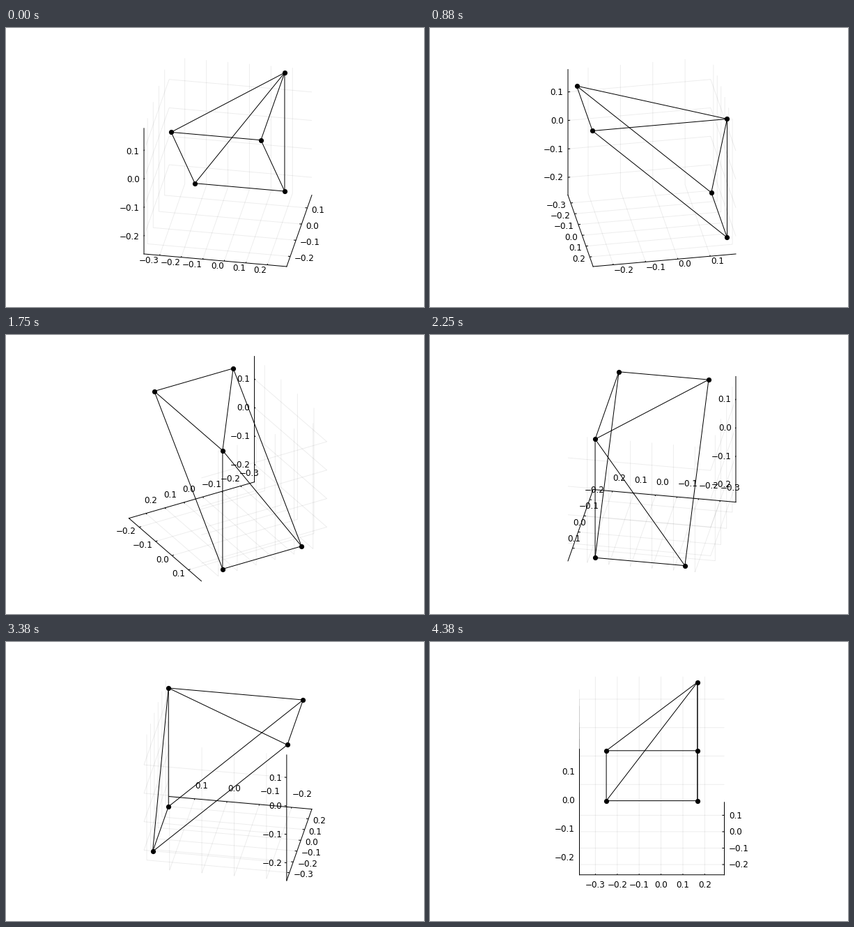
A matplotlib script for the animation above (4.51 s loop, 600 px wide and 400 px high).

```python
import numpy as np
import matplotlib.pyplot as plt
from matplotlib.animation import FuncAnimation
from matplotlib.collections import LineCollection

W, H, DPI = 600, 400, 100
PX = 72 / DPI                      # one pixel in points
POSES, POSE_MS = 36, 125           # the camera turns 10 degrees per pose
FRAMES, FRAME_MS = 205, 22         # 4510 ms in all
CX, CY, SIDE = 318.5, 191.7, 208   # projected centre and cube side
EL = np.radians(30)

# Data limits: 3 % padding, x stretched by the stage's aspect ratio
LO, HI = -1 / 4, 1 / 6
MID, SPAN = (LO + HI) / 2, (HI - LO) * 1.06
SPANS = np.array([SPAN * 1.5, SPAN, SPAN])

VERTS = [(HI, HI, HI), (HI, LO, HI), (HI, HI, LO), (LO, LO, HI), (LO, HI, LO)]
EDGES = [(0, 1), (0, 2), (0, 3), (0, 4), (1, 2), (1, 3), (2, 4), (3, 4)]
TICKS = [[-.3, -.2, -.1, 0, .1, .2], [-.2, -.1, 0, .1], [-.2, -.1, 0, .1]]
TICK_LEN = .015


def unit(value, axis):
    """Data value to cube coordinate in [-.5, .5]."""
    return (value - MID) / SPANS[axis]


def project(points, az):
    x, y, z = np.moveaxis(np.asarray(points, float), -1, 0)
    u = x * np.cos(az) + y * np.sin(az)
    depth = -x * np.sin(az) + y * np.cos(az)
    v = z * np.cos(EL) + depth * np.sin(EL)
    return np.stack([CX + SIDE * u, CY - SIDE * v], axis=-1)


def label_place(theta):
    """Offset (dx, dy) and alignment for an axis at screen angle theta."""
    out = np.radians(theta - 90)
    dx, dy = np.cos(out), -np.sin(out)
    if theta == 0:
        return 0, 14, 'center'
    if theta <= 90:
        return 6.4 * dx, 6.8 * dy, 'left'
    if theta < 270:
        return 7.5 * dx, 7.5 * dy - 11.8, 'left'
    return 6.4 * dx, 6.8 * dy, 'right'


def axis_angle(axis, az):
    if axis == 2:
        return 270
    if axis == 0:
        right, up = np.cos(az), -np.sin(az) * np.sin(EL)
    else:
        right, up = np.sin(az), np.cos(az) * np.sin(EL)
    return round(np.degrees(np.arctan2(up, right)), 6) % 360


a, b = -.5, .5
AXES = [[(a, a, a), (b, a, a)], [(b, a, a), (b, b, a)], [(a, a, a), (a, a, b)]]
grid, marks, anchors = [], [], []
for axis, values in enumerate(TICKS):
    for value in values:
        t = unit(value, axis)
        if axis == 0:
            path = [(t, a, a), (t, b, a), (t, b, b)]
            end = (t, a + TICK_LEN, a)
        elif axis == 1:
            path = [(b, t, a), (a, t, a), (a, t, b)]
            end = (b - TICK_LEN, t, a)
        else:
            path = [(a, a, t), (a, b, t), (b, b, t)]
            end = (a, a + TICK_LEN, t)
        grid += [path[:2], path[1:]]
        marks.append([path[0], end])
        anchors.append((axis, value, path[0]))

verts = np.array([[unit(c, k) for k, c in enumerate(p)] for p in VERTS])
wires = [[verts[i], verts[j]] for i, j in EDGES]

fig = plt.figure(figsize=(W / DPI, H / DPI), dpi=DPI, facecolor='white')
ax = fig.add_axes([0, 0, 1, 1])
ax.set_xlim(0, W)
ax.set_ylim(H, 0)
ax.axis('off')


def add_lines(segments, z, **style):
    lines = LineCollection([], linewidths=PX, zorder=z, snap=False, **style)
    ax.add_collection(lines, autolim=False)
    return lines, np.array(segments)


layers = [
    add_lines(grid, 1, colors=[(0, 0, 0, .07)]),
    add_lines(AXES, 2, colors='black', capstyle='projecting'),
    add_lines(marks, 2, colors='black'),
    add_lines(wires, 4, colors='black'),
]
dots, = ax.plot([], [], 'o', color='black', ms=7.2 * PX, mew=0, zorder=5)
labels = [ax.text(0, 0, f'{value:.1f}'.replace('-', '\u2212'), va='baseline',
                  family='DejaVu Sans', size=12 * PX, color='black', zorder=3)
          for _, value, _ in anchors]


def draw(frame):
    # A pose shows from the frame in which its start time falls
    last_ms = (frame + 1) * FRAME_MS - 1
    pose = min(last_ms // POSE_MS, POSES - 1)
    az = np.radians(10 * (pose + 1))
    for lines, segments in layers:
        lines.set_segments(project(segments, az))
    dots.set_data(*project(verts, az).T)
    for label, (axis, _, point) in zip(labels, anchors):
        x, y = project(point, az)
        dx, dy, align = label_place(axis_angle(axis, az))
        label.set_position((x + dx, y + dy + 4.4))
        label.set_ha(align)
    return [lines for lines, _ in layers] + [dots] + labels


anim = FuncAnimation(fig, draw, frames=FRAMES, interval=FRAME_MS,
                     repeat=True, repeat_delay=0)
plt.show()
```
